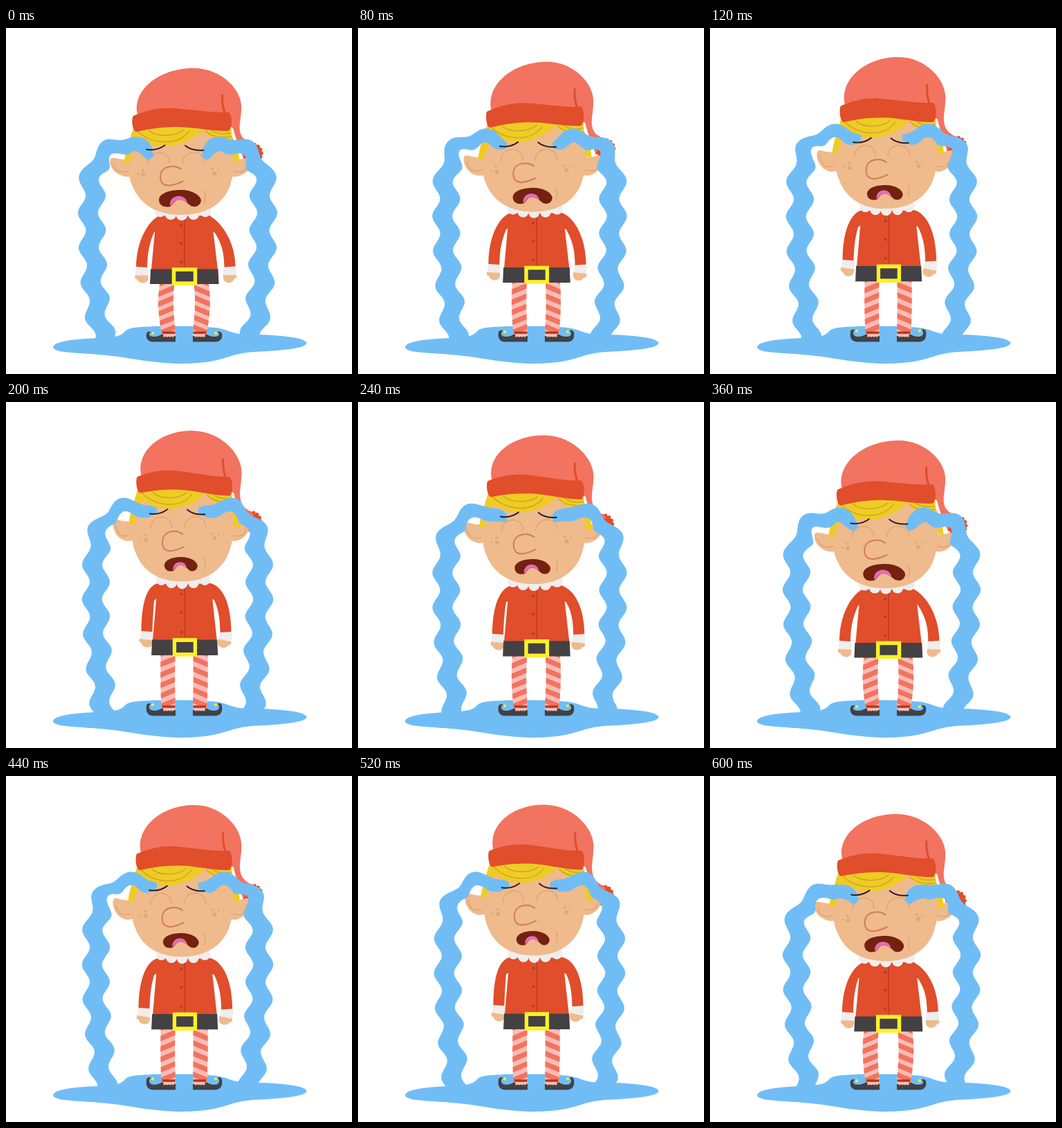
An HTML page with a canvas that plays this animation: 500x500 px, repeating every 0.64 s.

```html
<!DOCTYPE html>
<html lang="en">
<head>
<meta charset="utf-8">
<title>Crying elf</title>
<style>
html, body { margin: 0; width: 100%; height: 100%; overflow: hidden; background: #fff; }
canvas { display: block; width: 500px; height: 500px; }
</style>
</head>
<body>
<canvas id="stage" width="500" height="500"></canvas>
<script>
const ctx = document.getElementById('stage').getContext('2d');
const CYCLE = 320, STEP = 40;
const SKIN = '#efba8c', TAN = '#dfa676', RED = '#e04e2b', DEEP = '#b5391c';
const SALMON = '#f2735f', PINK = '#f9bdb6', HAIR = '#efcb25', STRAND = '#c7a321';
const WATER = '#70bdf6', DARK = '#434143', YELLOW = '#fff02a', WHITE = '#efedee';

let cos = 1, sin = 0, up = 0, turn = 0;

// Swinging value: middle, cosine part, sine part.
const h = (m, a, b = 0) => m + a * cos + b * sin;
const mix = (a, b, k) => a + (b - a) * k;

function fill(d, color) {
  ctx.fillStyle = color;
  ctx.fill(new Path2D(d));
}

function line(d, color, width) {
  ctx.strokeStyle = color;
  ctx.lineWidth = width;
  ctx.lineCap = 'round';
  ctx.stroke(new Path2D(d));
}

function dot(x, y, r, color) {
  ctx.fillStyle = color;
  ctx.beginPath();
  ctx.arc(x, y, r, 0, 7);
  ctx.fill();
}

function group(matrix, draw) {
  ctx.save();
  ctx.transform(...matrix);
  draw();
  ctx.restore();
}

// Affine matrix that carries three points p onto three points q.
function affine(p, q) {
  const [[x0, y0], [x1, y1], [x2, y2]] = p;
  const ux = x1 - x0, uy = y1 - y0, vx = x2 - x0, vy = y2 - y0;
  const det = ux * vy - uy * vx;
  const row = i => {
    const du = q[1][i] - q[0][i], dv = q[2][i] - q[0][i];
    const a = (du * vy - dv * uy) / det, c = (dv * ux - du * vx) / det;
    return [a, c, q[0][i] - a * x0 - c * y0];
  };
  const [a, c, e] = row(0), [b, d, f] = row(1);
  return [a, b, c, d, e, f];
}

const at = ([a, b, c, d, e, f], x, y) => [a * x + c * y + e, b * x + d * y + f];
const flip = axis => [-1, 0, 0, 1, 2 * axis, 0];
const SAME = [1, 0, 0, 1, 0, 0];

function puddle() {
  fill(`M68 461C70 452 105 449 135 448C182 446 163 437 183 433.500C205 430 270 430 302 433
    C325 436 322 442 350 443C385 443 432 446 434.500 455C434 463 400 466 360 468
    C318 470 318 485 250 485C205 484 180 476 140 472.500C105 469 68 470 68 461Z`, WATER);
}

function leg() {
  const top = h(367, 2.300), out = 4 * (1 - up), w = 1.500 * (1 - up);
  const x = 223.800 - w;
  const shape = new Path2D(`M${x} ${top}C${x - out} 395 ${x - out / 2} 412 224.500 441
    L245 441C${244.500 - out / 2} 415 ${244.500 - out} 400 ${x + 21} ${top}Z`);
  ctx.save();
  ctx.clip(shape);
  ctx.fillStyle = PINK;
  ctx.fillRect(210, 355, 45, 90);
  for (let i = -1; i < 7; i++) {
    const y = mix(top, 441, i / 5) + 8;
    fill(`M214 ${y + 6}L250 ${y - 9}V${y - 1}L214 ${y + 14}Z`, SALMON);
  }
  ctx.restore();
}

function shoe() {
  const tip = 440.500 - 4 * up;
  fill('M225 441H245V449H225Z', PINK);
  fill('M226 438.500H244.500V442H226Z', DEEP);
  fill(`M245 445V453.500H212C204 453.500 201 446 203.500 ${tip}C205 ${tip - 2} 208 ${tip - 2} 210 ${tip - 1}
    C205 ${tip + 1} 206 446 213 446C220 446 223 444 226 442L229 446Z`, DARK);
  for (let x = 229; x < 245; x += 4) dot(x, 445, 1.700, PINK);
  dot(212, tip + .5, 2.100, YELLOW);
}

function hand(x, y, angle) {
  ctx.save();
  ctx.translate(x, y);
  ctx.rotate(angle);
  fill('M-8 4C-11.500 7 -11 12 -7 12C-4 19 5 19 8 14C10 11 9 7 8 4Z', SKIN);
  ctx.fillStyle = WHITE;
  ctx.beginPath();
  ctx.roundRect(-9.500, -6.500, 18.500, 13, 2);
  ctx.fill();
  ctx.restore();
}

function sleeve(x, y, top, angle) {
  hand(x, y, angle);
  fill(`M224 ${top - 1}C206 ${top + 6 - 8 * up} ${x - 8} ${y - 44 - 12 * up} ${x - 8.500} ${y - 6}
    L${x + 7.500} ${y - 5}C${x + 8} ${y - 22} ${x + 9} ${y - 36} 214 ${top + 24}L235 ${top + 10}Z`, RED);
}

function body() {
  const top = h(266.400, 4.600, .9), base = h(367.700, 2.300, .2), half = h(48.500, 1);
  sleeve(h(199.750, -3.200, -2.800), h(344, 7, 2.900), top, .15 * up);
  group(flip(257.500), () =>
    sleeve(515 - h(320, 3, 1.200), h(344.500, 6, 3.200), top, -.24 * up));

  const mid = 257.500 + .5 * up;
  const m = affine([[257.500, 271], [307, 370], [208, 370]],
    [[mid, top], [mid + half, base], [mid - half, base]]);
  group(m, () => {
    fill('M220 271C235 267 280 267 295 271L299 290L306 349H210L215.500 290Z', RED);
    line('M258 274V348', DEEP, 1.200);
    for (const y of [285.500, 311, 338]) dot(253, y, 1.900, DEEP);
    fill('M209 348.500H306.500L307.500 370H208Z', DARK);
    ctx.strokeStyle = YELLOW;
    ctx.lineWidth = 5.500;
    ctx.strokeRect(242.500, 349, 31, 20);
    for (const [x, y] of [[223, 265], [238, 269], [254, 270], [271, 269], [288, 265]])
      dot(x, y, 8.300, WHITE);
    fill('M217 258H296L288 271H225Z', WHITE);
  });
}

function ear(tipX) {
  const tip = h(181.500, 8.500, 5), low = h(208.800, 6.200, 4.800);
  fill(`M190 ${tip - 4}C175 ${tip + 6} 162 ${tip - 4} ${tipX + 3} ${tip - 2}
    C${tipX - 3} ${tip + 1} ${tipX + 2} ${low - 2} 176 ${low}L190 ${low - 2}Z`, SKIN);
  line(`M${tipX + 5} ${tip + 7}C${tipX + 9} ${low - 6} 168 ${low - 6} 178 ${low - 8}`, TAN, 1.500);
}

function faceShape() {
  fill(`M182 150C173 180 175 212 183 229C195 258 222 270 253 270
    C291 270 313 253 322 232C331 211 332 178 325 150C300 120 205 120 182 150Z`, SKIN);
  line('M205 196C205 176 236 174 236.500 195M255 195C256 176 286 174 287.500 194', TAN, 1.500);
  line('M286 236C289 242 288.500 247 286.500 253', TAN, 1.500);
  line(`M253 204C247 200 241 199.500 236 200.500C227 202 223 208 223 215
    C223 224 228 228 236 227.500C244 227 250 224 255.500 221.500`, '#d27b58', 2);
  for (const [x, y, r] of [[191, 211, 1.400], [198.500, 212, 2.900], [197.500, 205.500, 1.700],
    [298, 203.500, 1.700], [301, 210, 2.900], [307, 205, 1.400]]) dot(x, y, r, TAN);
}

function lashes() {
  line('M203 175.500C212 177 222 175 229.500 169.500M259 170C265 175 275 177.500 285.500 176.500',
    '#252126', 2);
}

function mouth() {
  const x = h(252.300, -.8), w = h(54.500, 6.500, 2.700);
  const top = h(229, 5, 2), low = h(252, 7, 2.700);
  const m = affine([[251.500, 234], [282, 234], [251.500, 259]],
    [[x, top], [x + w / 2, top], [x, low]]);
  group(m, () => {
    fill(`M221 248C222 238 238 234 252 234C270 234 281 242 282 249C281 257 274 260 267 257
      C260 251 256 248 250 248C244 248 241 256 237 258C228 260 221 256 221 248Z`, '#74210f');
    fill('M237 257C235 239 261 238 262 253.500C258 250 255 248 250 248C244 248 241 255 237 257Z', '#e56bb9');
  });
}

function hair() {
  fill('M185 142C180 160 172 178 170.500 195L179 194C181 184 187 172 194 161L200 145Z', HAIR);
  fill('M322 148C331 163 337 178 337.500 193L328 192C329 182 324 170 316 150Z', HAIR);
  fill('M186 142C185 152 188 157 194 161C210 173 235 173 252 167C264 163 275 157 283 150L288 140Z', HAIR);
  fill('M283 142C289 154 300 163 327 165L325 140Z', HAIR);
  line('M191 150C207 167 248 172 265 149M206 148C218 158 245 157 257 147M288 149C298 158 312 159 325 157M297 148C305 153 315 154 324 152',
    STRAND, 1.300);
}

function pom(x, y) {
  dot(x, y, 13, RED);
  for (let i = 0; i < 14; i++) {
    const a = i * Math.PI / 7;
    dot(x + 12.500 * Math.cos(a), y + 12.500 * Math.sin(a), 2.700, RED);
  }
}

function tail(m) {
  const x = h(356, .5, 1), y = h(175.500, 5.500, -1);
  const p = (a, b) => at(m, a, b).join(' ');
  pom(x, y);
  fill(`M${p(340, 112)}C${p(340, 132)} ${p(331, 155)} ${x - 8} ${y - 18}
    L${x + 4} ${y - 10}L${x - 14} ${y + 6}C${p(336, 168)} ${p(330, 158)} ${p(324, 125)}Z`, SALMON);
}

function hat() {
  fill(`M190 125C182 90 221 58 271 58C310 58 343 89 340 118C339 133 337 140 336 148
    L318 140Z`, SALMON);
  line('M312.500 97C312 107 313 114 316 122', RED, 3.200);
  fill(`M184 127C201 120 219 115 241 116C272 118 299 123 321 121.500C327 123 328 144 322 148.500
    C301 150 271 143 247 143C219 143 203 147 188 150C182 148 181 130 184 127Z`, RED);
}

// Tear ribbon: [x, y, half width] while low, and while raised.
const LOW = [[210, 188, 5], [199, 175, 10], [182, 167, 11], [159, 173, 11], [141, 183, 12],
  [129, 202, 14], [124.500, 225, 14.500], [124, 260, 14.500], [124.500, 300, 14.500],
  [126.500, 350, 14.500], [131, 400, 14.500], [141, 455, 14.500]];
const HIGH = [[218, 158, 4], [205, 158, 9], [185, 152, 9.500], [165, 154, 10], [147, 165, 9.500],
  [137, 184, 13], [131, 212, 14.500], [130, 255, 14.500], [130, 300, 14.500],
  [132, 350, 14.500], [137, 400, 14.500], [142, 455, 14.500]];

function spline(pts, i, k) {
  const q = n => pts[Math.max(0, Math.min(pts.length - 1, n))];
  const [a, b, c, d] = [q(i - 1), q(i), q(i + 1), q(i + 2)];
  return b.map((v, j) => v + .5 * k * (c[j] - a[j] +
    k * (2 * a[j] - 5 * v + 4 * c[j] - d[j] + k * (3 * (v - c[j]) + d[j] - a[j]))));
}

function tear() {
  const base = LOW.map((p, i) => p.map((v, j) => mix(v, HIGH[i][j], up / .85)));
  const pts = [];
  for (let i = 0; i <= (base.length - 1) * 10; i++)
    pts.push(spline(base, Math.floor(i / 10), i % 10 / 10));

  // Arc length is counted back from the foot so that it equals y down the column.
  const len = [];
  let s = 455;
  for (let i = pts.length - 1; i >= 0; i--) {
    len[i] = s;
    if (i) s -= Math.hypot(pts[i][0] - pts[i - 1][0], pts[i][1] - pts[i - 1][1]);
  }
  const crest = 341 + 50 * turn - 15 * up;
  const outer = [], inner = [];
  pts.forEach(([x, y, w], i) => {
    const a = pts[Math.max(0, i - 1)], b = pts[Math.min(pts.length - 1, i + 1)];
    const dx = b[0] - a[0], dy = b[1] - a[1], l = Math.hypot(dx, dy);
    const nx = dy / l, ny = -dx / l;
    const amp = 5.700 * Math.min(1, .15 + i / 45);
    const o = amp * Math.cos((len[i] - crest) * 2 * Math.PI / 50);
    outer.push([x + nx * (o - w), y + ny * (o - w)]);
    inner.unshift([x + nx * (o + w), y + ny * (o + w)]);
  });
  ctx.fillStyle = WATER;
  ctx.beginPath();
  for (const p of [...outer, ...inner]) ctx.lineTo(...p);
  ctx.fill();
}

function draw(time) {
  turn = Math.floor(time % CYCLE / STEP) * STEP / CYCLE;
  cos = Math.cos(turn * 2 * Math.PI);
  sin = Math.sin(turn * 2 * Math.PI);
  up = (1 - cos) / 2;

  ctx.fillStyle = '#fff';
  ctx.fillRect(0, 0, 500, 500);

  const left = h(187.300, -3.300, -.6), right = h(324.600, -.6, -.3);
  const brow = h(142.300, 7.700, 3);
  const cap = affine([[184, 150], [324, 149], [269, 58]],
    [[left, h(140.500, 9.500, 3.500)], [right, h(141.500, 7.500, .3)], [h(270.300, -1.300), h(48.500, 9.500, .3)]]);
  const face = affine([[184, 150], [324, 150], [252, 270]],
    [[left, brow], [right, brow], [h(252.300, -.3), h(264.300, 5.700, 1.200)]]);

  puddle();
  for (const m of [SAME, flip(257.500)]) group(m, () => { leg(); shoe(); });
  body();
  tail(cap);
  ear(h(152, -2.500));
  group(flip(253), () => ear(h(151.500, -1.500)));
  group(face, faceShape);
  mouth();
  group(cap, hair);
  group(cap, hat);
  for (const m of [SAME, flip(248)]) group(m, tear);
  group(face, lashes);
}

function loop() {
  draw(performance.now());
  requestAnimationFrame(loop);
}
loop();
</script>
</body>
</html>
```
